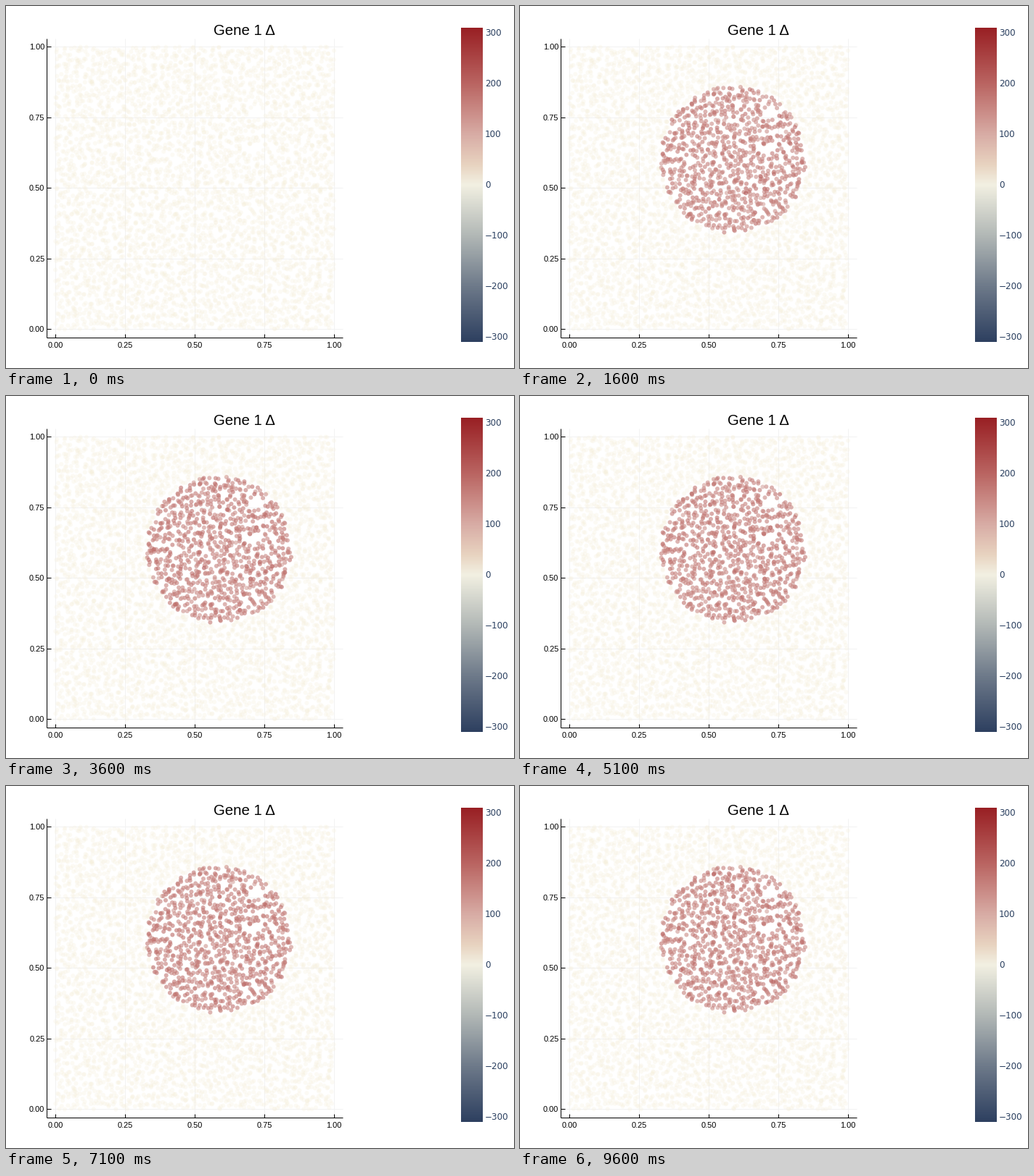
A matplotlib script for the animation above (10000 ms loop, 700x500 px).

```python
import numpy as np
import matplotlib.pyplot as plt
from matplotlib.animation import FuncAnimation
from matplotlib.colors import LinearSegmentedColormap, to_rgb

W, H, DPI = 700, 500, 100
PT = 72 / DPI  # points per pixel
SANS = "Liberation Sans"
LIMIT = 310
SIDE = 66  # cells per row of the jittered layout
STEPS = 21

STOPS = [(-310, "#2e4060"), (-200, "#6e7a8a"), (-100, "#b2b8b6"),
         (0, "#f2f0e2"), (40, "#e8d3c0"), (100, "#d8aca5"),
         (200, "#ba6562"), (310, "#992024")]
cmap = LinearSegmentedColormap.from_list(
    "delta", [((v + LIMIT) / (2 * LIMIT), c) for v, c in STOPS], N=512)
IDLE = (*to_rgb("#f6efda"), 0.28)


def px(x):
    return 68 + 384 * x


def py(y):
    return 446.5 - 390 * y


def make_cells(rng):
    """Evenly scattered cells, with a few sparse spots inside the disc."""
    grid = np.stack(np.meshgrid(*[np.arange(SIDE) + 0.5] * 2), -1).reshape(-1, 2)
    pos = np.abs((grid + rng.uniform(-0.9, 0.9, grid.shape)) / SIDE)
    pos = 1 - np.abs(1 - pos)  # reflect at the borders
    rng.shuffle(pos)
    x, y = px(pos[:, 0]), py(pos[:, 1])
    disc = np.hypot(pos[:, 0] - 0.5875, pos[:, 1] - 0.601) < 0.261
    keep = np.ones(len(pos), bool)
    for gx, gy, r in [(346, 146, 9), (347, 194, 8), (234, 213, 8)]:
        keep &= ~(disc & (np.hypot(x - gx, y - gy) < r))
    return x[keep], y[keep], disc[keep]


def make_levels(rng, n):
    """Rise to a plateau, then part of the cells redraw at every step."""
    levels = [np.zeros(n), np.full(n, 92.0), np.full(n, 146.0)]
    while len(levels) < STEPS:
        fresh = rng.normal(165, 15, n) + 60 * (rng.random(n) < 0.006)
        levels.append(np.where(rng.random(n) < 0.45, fresh, levels[-1]))
    return levels


def cell_colors(v):
    rgba = cmap((v + LIMIT) / (2 * LIMIT))
    rgba[:, 3] = np.interp(v, [0, 150], [IDLE[3], 0.6])
    rgba[v == 0] = IDLE
    return rgba


rng = np.random.default_rng(12)
x, y, disc = make_cells(rng)
levels = make_levels(rng, disc.sum())

fig = plt.figure(figsize=(W / DPI, H / DPI), dpi=DPI, facecolor="white")
ax = fig.add_axes([0, 0, 1, 1])
ax.axis("off")


def line(xs, ys, color="black", z=3):
    ax.plot(xs, ys, color=color, lw=PT, zorder=z, solid_capstyle="butt")


def label(tx, ty, s, size, ha="center", font=SANS, color="black"):
    ax.text(tx, ty, s, fontsize=size * PT, family=font, color=color,
            ha=ha, va="baseline", zorder=4)


# Whole-pixel coordinates: thin lines snap to the pixel that starts there.
for t in np.linspace(0, 1, 5):
    tx, ty = int(px(t)), int(py(t))
    line([tx, tx], [45, 458], "#f2f2f2", 1)
    line([56, 464], [ty, ty], "#f2f2f2", 1)
    line([tx, tx], [453, 458])
    line([56, 62], [ty, ty])
    label(px(t) + 0.2, 472, f"{t:.2f}", 11)
    label(53.5, ty + 4.2, f"{t:.2f}", 11, ha="right")
line([56, 56], [45, 458])
line([56, 464], [458, 458])
label(328.3, 40, "Gene 1 Δ", 20.4)

ax.imshow(np.linspace(LIMIT, -LIMIT, 434)[:, None], cmap=cmap,
          extent=(627, 657, 464, 30), aspect="auto", zorder=2)
for v in range(-300, 301, 100):
    label(660, 247 - 0.7 * v + 4.3, str(v).replace("-", "−"), 12,
          ha="left", font="DejaVu Sans", color="#2a3f5f")
ax.set_xlim(0, W)
ax.set_ylim(H, 0)

dots = ax.scatter(x, y, s=(6 * PT) ** 2, linewidths=0, zorder=2)
values = np.zeros(len(x))


def draw(i):
    values[disc] = levels[(i + 4) // 5]
    dots.set_facecolors(cell_colors(values))
    return (dots,)


anim = FuncAnimation(fig, draw, frames=100, interval=100,
                     repeat=True, repeat_delay=0, blit=False)
plt.show()
```
